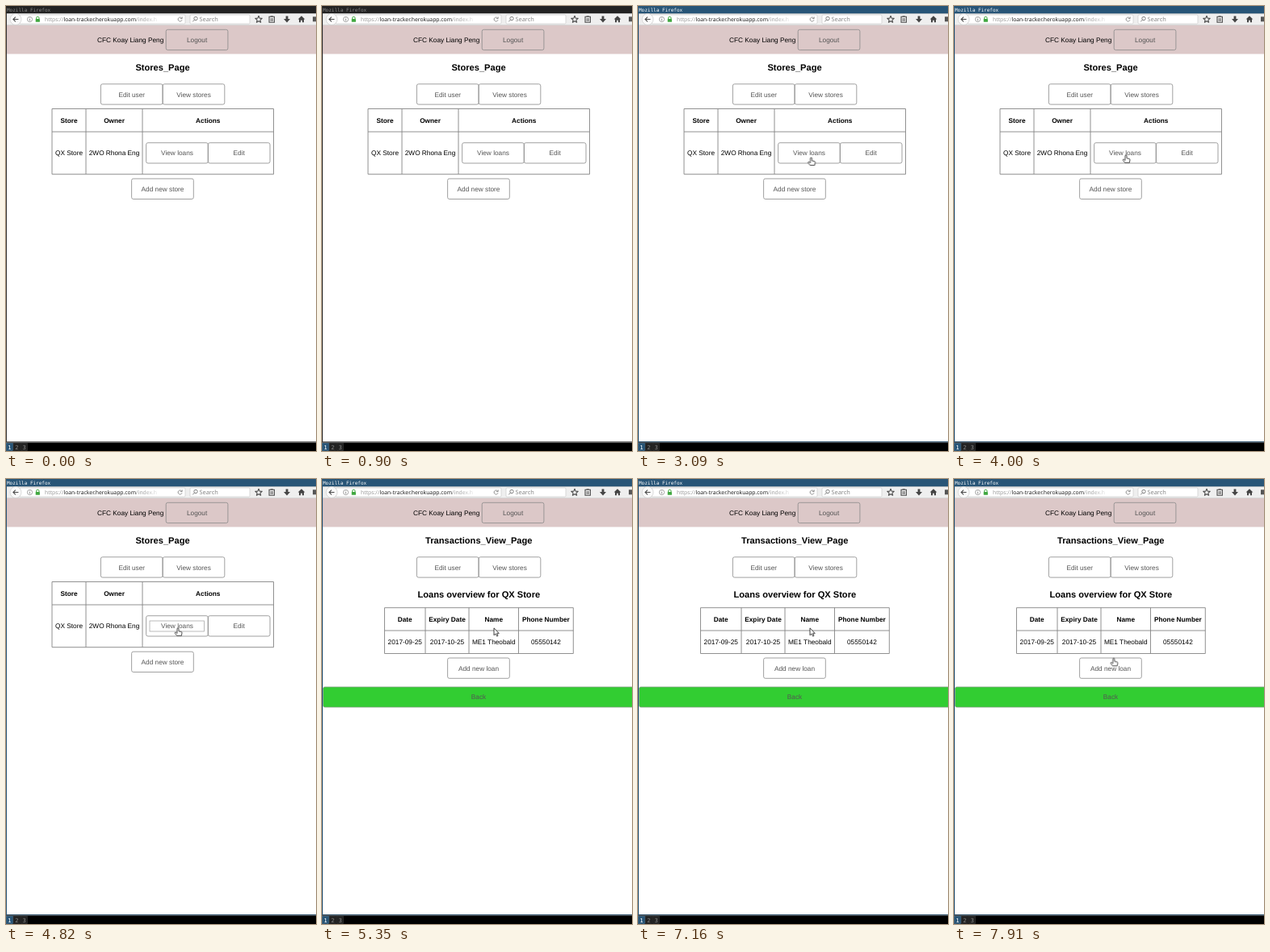
An HTML page that plays this animation: 384x552 px, repeating every 7990 ms.

```html
<!DOCTYPE html>
<html lang="en">
<head>
<meta charset="utf-8">
<title>Loan tracker</title>
<style>
html, body { margin: 0; width: 100%; height: 100%; overflow: hidden; background: #fff; }
svg { display: block; width: 384px; height: 552px; text-rendering: geometricPrecision; }
text { font: 8.28px "Liberation Sans", Arial, sans-serif; }
.mid { text-anchor: middle; }
.bold { font-weight: bold; }
.title { font-size: 11.1px; font-weight: bold; }
.label { fill: #555; }
.mono { font: 6px "DejaVu Sans Mono", monospace; }
.ui { font: 6.8px "Noto Sans", sans-serif; }
.button { fill: none; stroke: #8a8a8a; stroke-width: .8; }
.grid { fill: none; stroke: #858585; stroke-width: .9; }
.icon { fill: none; stroke: #4a4a4a; stroke-width: 1.1; }

#active, #stores, #loans, #ring, #hand, #arrow { animation: 7990ms step-end infinite; }
#active { animation-name: active; }
#stores { animation-name: stores; }
#loans { animation-name: loans; }
#ring { animation-name: ring; }
#hand { animation-name: hand; }
#arrow { animation-name: arrow; }
#pointer { animation: move 7990ms linear infinite; }

@keyframes active { 0% { opacity: 0 } 32.04%, 100% { opacity: 1 } }
@keyframes stores { 0% { opacity: 1 } 66.08%, 100% { opacity: 0 } }
@keyframes loans { 0% { opacity: 0 } 66.08%, 100% { opacity: 1 } }
@keyframes ring { 0% { opacity: 0 } 59.45%, 100% { opacity: 1 } }
@keyframes hand {
  0% { opacity: 0 } 34.2% { opacity: 1 } 66.08% { opacity: 0 } 98%, 100% { opacity: 1 }
}
@keyframes arrow {
  0% { opacity: 0 } 32.04% { opacity: 1 } 34.2% { opacity: 0 }
  66.08% { opacity: 1 } 98%, 100% { opacity: 0 }
}
@keyframes move {
  0% { transform: translate(390px, 210px) }
  32.04% { transform: translate(390px, 210px); animation-timing-function: cubic-bezier(.2, .6, .4, 1) }
  38.3%, 42.5% { transform: translate(214.5px, 188px); animation-timing-function: ease-in-out }
  48.8%, 93.2% { transform: translate(213px, 184.8px); animation-timing-function: ease-in-out }
  98.2%, 100% { transform: translate(197.8px, 222.3px) }
}
</style>
</head>
<body>
<svg viewBox="0 0 384 552">
  <defs>
    <linearGradient id="fade">
      <stop offset="0" stop-color="#fff" stop-opacity="0"/>
      <stop offset="1" stop-color="#fff"/>
    </linearGradient>
  </defs>
  <rect width="384" height="552" fill="#fff"/>

  <!-- window frame -->
  <rect width="384" height="9.5" fill="#222"/>
  <path d="M.5 9V541M0 540.8H384" stroke="#333" fill="none"/>
  <text class="mono" x="1" y="6.8" fill="#888">Mozilla Firefox</text>
  <g id="active">
    <rect width="384" height="9.5" fill="#285577"/>
    <path d="M.5 9V541M0 540.8H384" stroke="#285577" fill="none"/>
    <text class="mono" x="1" y="6.8" fill="#fff">Mozilla Firefox</text>
  </g>

  <!-- toolbar -->
  <rect x="1" y="9.5" width="383" height="14" fill="#efefef"/>
  <path d="M1 23.6H384" stroke="#c4c4c4" stroke-width=".7"/>
  <rect x="17" y="11" width="205" height="11" rx="1.2" fill="#fff" stroke="#c4c4c4" stroke-width=".6"/>
  <circle cx="12" cy="16.5" r="7" fill="#fafafa" stroke="#c4c4c4" stroke-width=".6"/>
  <path class="icon" d="M15.4 16.5H9M11.8 13.6 8.9 16.5 11.8 19.4"/>
  <circle cx="29.5" cy="16.5" r="3.1" fill="none" stroke="#808080" stroke-width=".7"/>
  <path d="M29.5 16V18.4M29.5 14.5V15.3" stroke="#808080" stroke-width=".8"/>
  <path d="M37.6 16V14.9A1.7 1.7 0 0 1 41 14.9V16" fill="none" stroke="#3fa73f"/>
  <rect x="36.7" y="16" width="5.2" height="3.8" rx=".4" fill="#3fa73f"/>
  <text class="ui" x="48" y="18.9" fill="#999">https://<tspan fill="#222">loan-tracker.herokuapp.com</tspan>/index.h</text>
  <rect x="168" y="12" width="27" height="9" fill="url(#fade)"/>
  <rect x="194" y="12" width="14" height="9" fill="#fff"/>
  <path d="M217.6 15A2.5 2.5 0 1 0 218 17.3M218.2 13.4V15.6H216" fill="none" stroke="#777" stroke-width=".8"/>
  <rect x="228" y="11" width="74" height="11" rx="1.2" fill="#fff" stroke="#c4c4c4" stroke-width=".6"/>
  <path d="M231.2 19.4 233.4 17.2" stroke="#777"/>
  <circle cx="235" cy="15.5" r="2.2" fill="none" stroke="#777" stroke-width=".9"/>
  <text class="ui" x="239.5" y="18.9" fill="#888" style="font-size:7.4px">Search</text>
  <path class="icon" stroke-linejoin="round" d="M313 12.3 314.2 15.1 317.2 15.3 314.9 17.3 315.6 20.3 313 18.7 310.4 20.3 311.1 17.3 308.8 15.3 311.8 15.1Z"/>
  <path class="icon" d="M326 13.3H332.4V20.2H326ZM327.6 12.8H330.8M327.4 16H331M327.4 18H331"/>
  <path d="M346.6 12.6H349.4V16H352L348 20.4 344 16H346.6Z" fill="#444"/>
  <path d="M366 12.3 370.4 16.6H369V20.3H367V17.8H365V20.3H363V16.6H361.6Z" fill="#444"/>
  <rect x="380" y="13.3" width="6" height="6" fill="#555"/>

  <!-- page header -->
  <rect x="1" y="24" width="383" height="35.5" fill="#dcc8c8"/>
  <text x="113" y="45">CFC Koay Liang Peng</text>
  <g id="common"></g>
  <g id="stores"></g>
  <g id="loans"></g>

  <!-- workspace bar -->
  <rect y="541.5" width="384" height="10.5" fill="#000"/>
  <rect x=".4" y="542.4" width="8" height="9.2" fill="#285577" stroke="#4c7899" stroke-width=".6"/>
  <rect x="9.4" y="542.4" width="8" height="9.2" fill="#222" stroke="#333" stroke-width=".6"/>
  <rect x="18.4" y="542.4" width="8" height="9.2" fill="#222" stroke="#333" stroke-width=".6"/>
  <g class="mid" fill="#888">
    <text class="mono" x="4.4" y="549.6" fill="#fff" style="font-size:7px">1</text>
    <text class="mono" x="13.4" y="549.6" style="font-size:7px">2</text>
    <text class="mono" x="22.6" y="549.6" style="font-size:7px">3</text>
  </g>

  <g id="pointer" fill="#fff" stroke-linejoin="round">
    <path id="arrow" stroke="#111" stroke-width=".8" d="M0 0V9L2.1 7.2 3.6 10.2 5 9.6 3.6 6.7H6.3Z"/>
    <path id="hand" stroke="#222" stroke-width=".8" d="M-1 1Q-1 0 0 0T1 1V4L4.2 4.6Q5 4.9 5 6L4.4 9.5H-1.4L-3.8 6.3Q-3.9 5.2 -2.7 5.3L-1 6.6Z"/>
  </g>
</svg>
<script>
const text = (x, y, label, cls = '') => `<text class="mid ${cls}" x="${x}" y="${y}">${label}</text>`;

const button = (x, y, label) =>
  `<rect class="button" x="${x}" y="${y}" width="76.7" height="25.3" rx="2.2"/>` +
  text(x + 38.4, y + 15.7, label, 'label');

// xs and ys are the grid lines; the first row is the heading
const table = (xs, ys, rows) => {
  const [left, right, top, bottom] = [xs[0], xs.at(-1), ys[0], ys.at(-1)];
  const lines = xs.map(x => `M${x} ${top}V${bottom}`).join('') +
    ys.map(y => `M${left} ${y}H${right}`).join('');
  const cells = rows.map((row, r) => row.map((cell, c) =>
    text((xs[c] + xs[c + 1]) / 2, (ys[r] + ys[r + 1]) / 2 + 3, cell, r ? '' : 'bold')).join('')).join('');
  return `<path class="grid" d="${lines}"/>` + cells;
};

const fill = (id, ...parts) => document.getElementById(id).innerHTML = parts.join('');

fill('common',
  button(198.2, 29.3, 'Logout'),
  button(117.4, 96.8, 'Edit user'),
  button(194.1, 96.8, 'View stores'));

fill('stores',
  text(194, 80, 'Stores_Page', 'title'),
  table([57, 99, 169, 331.5], [127.5, 156, 208.7],
    [['Store', 'Owner', 'Actions'], ['QX Store', '2WO Rhona Eng']]),
  button(173.6, 169.7, 'View loans'),
  button(250.3, 169.7, 'Edit'),
  button(155.6, 214.2, 'Add new store'),
  '<rect id="ring" x="178" y="176" width="67.5" height="13" fill="none" stroke="#aaa" stroke-width=".8"/>');

fill('loans',
  text(194.3, 80, 'Transactions_View_Page', 'title'),
  text(194.3, 147.2, 'Loans overview for QX Store', 'title'),
  table([77.5, 128, 182, 243.5, 311.3], [159.7, 188, 216.5],
    [['Date', 'Expiry Date', 'Name', 'Phone Number'],
     ['2017-09-25', '2017-10-25', 'ME1 Theobald', '05550142']]),
  button(155.6, 222, 'Add new loan'),
  '<rect x="1.4" y="258" width="386" height="25" rx="2.2" fill="#32cd32" stroke="#7f9f7f" stroke-width=".8"/>',
  text(194, 273.3, 'Back', 'label'));
</script>
</body>
</html>
```
